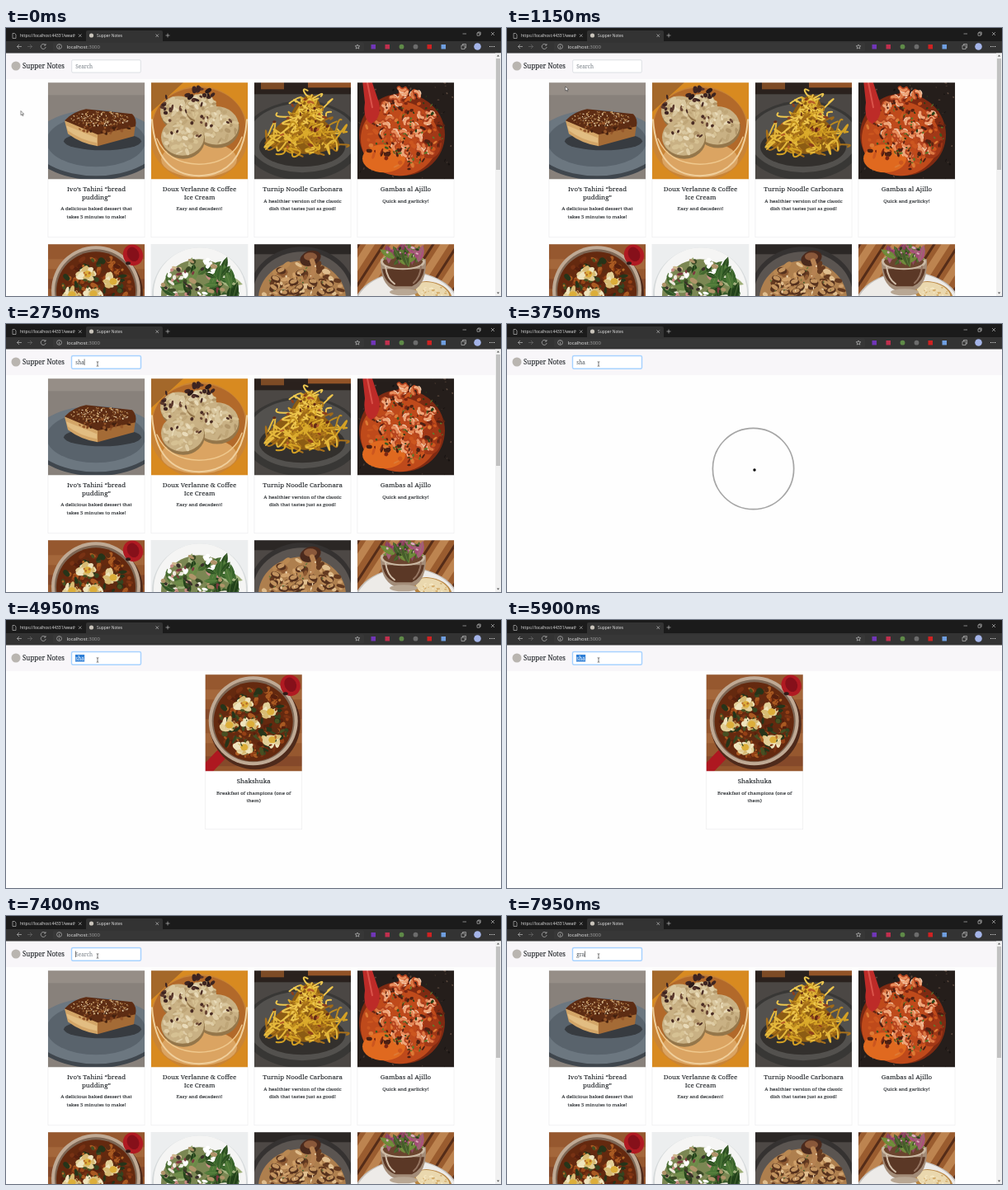
An HTML page for the animation above (8 s loop, 600 by 325 pixels).

```html
<!DOCTYPE html>
<html lang="en">
<head>
<meta charset="utf-8">
<title>Supper Notes</title>
<style>
  html, body { margin: 0; width: 100%; height: 100%; overflow: hidden; background: #fefefe; }
  #stage { display: block; width: 600px; height: 325px; font-family: "Noto Serif", serif; fill: #212529; }
  .ui { font-family: "Open Sans", sans-serif; font-size: 4.9px; fill: #e8e8e8; }
  .icon { fill: none; stroke: #cfcfcf; stroke-width: .6; }
  .name { font-size: 7.9px; font-weight: 500; text-anchor: middle; stroke: #212529; stroke-width: .12; }
  .about { font-size: 6.1px; text-anchor: middle; stroke: #212529; stroke-width: .12; }
  .photo { filter: blur(.4px); }
  #query { font-size: 6.4px; }
</style>
</head>
<body>
<svg id="stage" viewBox="0 0 600 325">
  <rect width="600" height="325" fill="#fefefe"/>
  <rect y="30" width="600" height="32" fill="#f8f6f9"/>

  <g id="chrome">
    <rect width="600" height="30.5" fill="#333"/>
    <path d="M0 0H600V16H190V5Q190 3 188 3H99Q97 3 97 5V16H0Z" fill="#1b1b1b"/>
    <rect x="57" y="17.5" width="377" height="10.5" rx="1.5" fill="#373737"/>
    <svg x="17" width="67" height="16"><text class="ui" y="11">https://localhost:44331/weatherforecast</text></svg>
    <text class="ui" x="110" y="11">Supper Notes</text>
    <circle cx="103.5" cy="9" r="2.6" fill="#c9c4bb"/>
    <text class="ui" x="73.5" y="24.8" style="font-size:6px">localhost<tspan fill="#a0a0a0">:3000</tspan></text>
    <path class="icon" d="M8 6.5h2.5l1.5 1.5v4.5h-4zM88 7.5l3.5 3.5m0-3.500l-3.5 3.500M181.500 7.500l3.500 3.500m0-3.500l-3.500 3.500M193.500 9h5m-2.500-2.500v5
      M553.500 7h4.500M571 6h3.200v3.200h-3.200zM572 6v-1h3.200v3.200h-1M588 5l4 4m0-4l-4 4"/>
    <path class="icon" d="M19 22.500H13.500M16 20l-2.500 2.500L16 25M47.500 20.500A3 3 0 1 0 48.200 23M48 19v2h-2M64.500 22v2.500M64.500 20.500v.7"/>
    <path class="icon" d="M26 22.500h5.500M29 20l2.500 2.500L29 25" opacity=".4"/>
    <circle class="icon" cx="64.500" cy="22.500" r="2.900"/>
    <path class="icon" d="M426 20l.8 1.800h2l-1.500 1.300.5 2-1.800-1.100-1.800 1.100.5-2-1.500-1.300h2zM552 21h4v4.500h-4zM553.500 21v-1.500h4v4.500h-1.500"/>
    <rect x="442.500" y="20" width="5.500" height="5.500" fill="#7136b8"/>
    <rect x="459.500" y="20" width="5.500" height="5.500" fill="#c02f4e"/>
    <circle cx="479.500" cy="22.700" r="2.900" fill="#5f8a48"/>
    <circle cx="496.500" cy="22.700" r="2.900" fill="#6c6c6c"/>
    <rect x="510.500" y="20" width="5.500" height="5.500" fill="#cf2222"/>
    <rect x="527.500" y="20" width="5.500" height="5.500" fill="#6f9fe0"/>
    <circle cx="571.500" cy="22.500" r="4.300" fill="#a4b4e8"/>
    <path d="M586 22.500h1.200m1.300 0h1.200m1.300 0h1.200" stroke="#ddd" stroke-width="1.100"/>
  </g>

  <circle cx="12" cy="46" r="5.500" fill="#b9b5b0"/>
  <text x="20" y="49" font-size="8" font-weight="500" stroke="#212529" stroke-width=".12">Supper Notes</text>

  <rect id="glow" x="78.700" y="37.800" width="85.600" height="17.200" rx="2.300" fill="#bfdeff"/>
  <rect id="field" x="79.700" y="38.800" width="83.600" height="15.200" rx="1.300" fill="#fff" stroke-width=".7"/>
  <rect id="selection" x="84" y="42" width="0" height="8.500" fill="#2f7fd6"/>
  <text id="query" x="84.300" y="48.600"></text>
  <rect id="caret" y="42.500" width=".6" height="7.500" fill="#222"/>

  <g id="list"></g>
  <g id="result"></g>
  <g id="spinner" fill="none" stroke="#000" stroke-width="1.700"><circle/><circle/></g>
  <path id="arrow" d="M0 0V5.200L1.300 4.100 2.200 6.100 3 5.700 2.100 3.800H3.700Z" fill="#fff" stroke="#222" stroke-width=".5"/>
  <path id="beam" d="M-1.300-2.800Q0-2.800 0-2V2Q0 2.800-1.300 2.800M1.300-2.800Q0-2.800 0-2M0 2Q0 2.800 1.300 2.800" fill="none" stroke="#222" stroke-width=".6"/>
</svg>

<script>
const $ = id => document.getElementById(id);

// ---------- drawing helpers ----------
let seed = 1;
const rnd = (a = 0, b = 1) => {
  seed = seed * 16807 % 2147483647;
  return a + (b - a) * seed / 2147483647;
};
const pick = colors => colors[Math.floor(rnd(0, colors.length))];
const rect = (x, y, w, h, fill) => `<rect x="${x}" y="${y}" width="${w}" height="${h}" fill="${fill}"/>`;
const backdrop = fill => rect(-3, -3, 123, 123, fill);
const oval = (x, y, rx, ry, fill, turn = 0) =>
  `<ellipse rx="${rx}" ry="${ry}" fill="${fill}" transform="translate(${x} ${y}) rotate(${turn})"/>`;
const shape = (d, fill) => `<path d="${d}" fill="${fill}"/>`;
const line = (d, stroke, width) =>
  `<path d="${d}" fill="none" stroke="${stroke}" stroke-width="${width}" stroke-linecap="round"/>`;

// Places n pieces at random inside an ellipse.
function scatter(n, cx, cy, rx, ry, piece) {
  let out = '';
  for (let i = 0; i < n; i++) {
    const a = rnd(0, 2 * Math.PI), r = Math.sqrt(rnd());
    out += piece(cx + rx * r * Math.cos(a), cy + ry * r * Math.sin(a));
  }
  return out;
}
const bits = (min, max, colors) => (x, y) =>
  oval(x, y, rnd(min, max), rnd(min, max) * .6, pick(colors), rnd(0, 180));
const curl = (size, width, colors) => (x, y) => {
  const p = () => rnd(-size, size);
  return line(`M${x} ${y}q${p()} ${p()} ${p()} ${p() * .7}t${p()} ${p() * .7}`, pick(colors), width);
};
const leaf = colors => (x, y) => {
  const turn = rnd(0, 360), size = rnd(.6, 1.1);
  return `<g transform="translate(${x} ${y}) rotate(${turn}) scale(${size})">` +
    shape('M-10 0Q-2-8 11 0Q-2 8-10 0', pick(colors)) + line('M-9 0H9', '#7f9c58', .4) + '</g>';
};
const prawn = (x, y) =>
  `<g transform="translate(${x} ${y}) rotate(${rnd(0, 360)})">` + line('M-4 3A5 5 0 0 1 4 3', '#b4431f', 5) +
  line('M-4 2A5 5 0 0 1 4 2', pick(['#e88d5c', '#f0a679', '#dd7a45']), 3.4) + line('M-2-2A5 5 0 0 1 3-1', '#f6cdaf', 1.2) + '</g>';

// ---------- photos, each 117 x 117 ----------
const photos = {
  pudding: () => backdrop('#88817b') + rect(-3, -3, 123, 18, '#968e87') +
    oval(58, 76, 78, 42, '#3f464d') + oval(58, 73, 76, 40, '#6c7780') + oval(58, 71, 60, 31, '#59636c') +
    oval(66, 71, 47, 11, '#373b40') +
    shape('M20 46L60 60V77Q40 74 24 62Z', '#d3a567') + shape('M60 60L106 50L104 65L60 77Z', '#a46b36') +
    shape('M22 52L59 67V73Q38 69 24 58Z', '#e2bd82') +
    shape('M20 46Q30 35 46 32L102 38Q108 44 106 53L60 63Z', '#5d2c13') +
    scatter(30, 68, 54, 32, 8, bits(1, 3, ['#7d411d', '#42200f', '#94562a'])) +
    scatter(150, 62, 44, 36, 9, bits(.5, 1.4, ['#f2dfbb', '#d7b27d', '#a8733f'])),

  iceCream: () => backdrop('#d88a20') + shape('M-3-3H42L-3 38Z', '#a4682a') +
    oval(58, 62, 60, 58, '#c98435') + oval(58, 52, 56, 46, '#b2692a') + oval(58, 93, 46, 22, '#dba462') +
    line('M1 45Q6 112 58 113Q111 112 116 45', '#f0cf9c', 2) + line('M7 68Q20 98 58 99Q98 98 110 66', '#efc88d', 1.5) +
    [[33, 35, 22], [60, 30, 19], [79, 52, 27], [38, 66, 26]].map(([x, y, r]) =>
      oval(x + 1, y + 3, r, r * .9, '#94764a') + oval(x, y, r, r * .86, '#c9b184') +
      scatter(40, x, y, r * .9, r * .8, bits(1.5, 5, ['#b1966a', '#dfcda6', '#bfa678', '#d6c193'])) +
      scatter(16, x - 3, y - 6, r * .6, r * .4, bits(2, 5, ['#e9dbb9', '#d9c79f']))).join('') +
    scatter(16, 63, 15, 20, 9, bits(2, 5, ['#3d2421', '#54322a', '#2b1918'])) +
    scatter(9, 20, 29, 9, 12, bits(2, 4, ['#3d2421', '#5a382c'])) +
    scatter(18, 57, 48, 40, 30, bits(1.5, 3.4, ['#4a2c24', '#6a4634'])),

  noodles: () => backdrop('#4b4744') + rect(-3, -3, 123, 17, '#2a211d') +
    rect(8, -3, 28, 11, '#7d4b25') + rect(65, -3, 55, 9, '#925327') +
    oval(58, 70, 72, 48, '#383735') + oval(58, 67, 66, 42, '#53514e') + oval(58, 78, 52, 24, '#33302d') +
    shape('M12 74Q24 52 42 43Q54 16 70 14Q82 20 82 44Q98 55 104 76Q60 98 12 74Z', '#8c5c14') +
    scatter(50, 58, 69, 40, 17, curl(13, 2, ['#d5a224', '#e5b93c', '#a9711a', '#bd8a1e'])) +
    scatter(45, 60, 48, 22, 18, curl(11, 2, ['#dbab2c', '#eec64d', '#a06a18', '#c4921f'])) +
    scatter(18, 66, 26, 11, 12, curl(9, 2, ['#dcae30', '#edc850', '#b07a1c'])) +
    scatter(24, 56, 52, 33, 32, bits(1.2, 3.6, ['#8d3f1c', '#642a14', '#b65e28'])),

  shrimp: () => backdrop('#251e1b') + scatter(110, 58, 58, 80, 80, bits(.5, 2, ['#43352d', '#5d4a3f', '#171210'])) +
    oval(54, 63, 52, 50, '#7f2a12') + oval(51, 68, 47, 45, '#bf4a1b') +
    oval(32, 92, 26, 17, '#e0691f') + oval(87, 72, 15, 20, '#a23817') +
    scatter(110, 55, 60, 47, 46, bits(1.5, 4.5, ['#7c2612', '#dd7a35', '#cc561f', '#4d2013'])) +
    scatter(42, 62, 50, 42, 42, prawn) +
    scatter(80, 60, 54, 46, 46, bits(.8, 2.6, ['#3c5920', '#5d7a2d', '#2a3f19', '#5a2312'])) +
    shape('M6-3H17L26 24Q30 42 17 50Q6 45 9 24Z', '#bd2b28') + line('M12 0L18 30', '#d9524a', 2),

  shakshuka: () => backdrop('#96582f') +
    [18, 42, 71, 99].map((y, i) => rect(-3, y, 123, 12, i % 2 ? '#85492a' : '#a4673b')).join('') +
    line('M-2 119L18 98', '#ae1820', 14) + oval(60, 60, 55, 55, '#4e2a1b') +
    oval(58, 56, 54, 54, '#bfa994') + oval(58, 56, 50, 50, '#7d6654') + oval(58, 57, 48, 48, '#64290f') +
    scatter(120, 58, 58, 43, 43, bits(2, 5, ['#944016', '#56200e', '#a95a22', '#783214'])) +
    scatter(95, 58, 57, 42, 42, bits(2, 6, ['#344420', '#474f22', '#263419', '#5c2b12'])) +
    [[47, 36], [78, 45], [28, 61], [54, 60], [80, 79], [46, 88]].map(([x, y]) =>
      scatter(14, x, y, 9, 7, bits(3.500, 6.500, ['#e3cf98', '#d8bb74', '#efe4bd'])) +
      oval(x + 1, y, 4.5, 4, '#dcae3a')).join('') +
    scatter(40, 58, 57, 42, 42, bits(.8, 2.500, ['#3a4a22', '#7d3413', '#b56a28'])) +
    oval(103, 13, 12, 13, '#b01a22', -25) + oval(103, 12, 7, 9, '#86101a', -25) + oval(97, 23, 3, 2, '#321b18'),

  salad: () => backdrop('#eceeef') + oval(59, 61, 58, 57, '#d5d9da') + oval(59, 59, 56, 55, '#f5f5f4') +
    oval(58, 62, 46, 44, '#7b8753') +
    scatter(60, 58, 58, 45, 40, leaf(['#2f5426', '#44692f', '#6c8a48', '#22421a', '#a5b380'])) +
    scatter(60, 52, 50, 40, 32, bits(2, 5, ['#eeeade', '#cfb98f', '#b0946a', '#fff', '#3b4a26'])) +
    scatter(24, 48, 48, 34, 24, bits(1.500, 4, ['#7d3a40', '#39302a', '#c98d85'])) +
    scatter(12, 84, 40, 18, 18, leaf(['#37632a', '#4c7837', '#2a4f20'])),

  mushrooms: () => backdrop('#4d4845') + rect(-3, -3, 123, 15, '#2b2725') +
    oval(58, 62, 65, 59, '#353231') + oval(58, 62, 60, 53, '#5b5551') + oval(58, 66, 53, 46, '#ae7f4e') +
    scatter(120, 58, 62, 49, 40, bits(2, 6, ['#cfa06b', '#8d5932', '#e0be8e', '#643a20', '#b98852'])) +
    scatter(30, 58, 60, 44, 35, (x, y) => oval(x, y, 6, 4, '#55311d', rnd(-40, 40)) + oval(x, y - 1, 4.500, 2.500, '#c2935f', rnd(-40, 40))) +
    oval(68, 17, 13, 9, '#4b2a1d', -20) + oval(68, 15, 8, 5, '#8a583a') + line('M70 20Q75 31 69 39', '#b68252', 6) +
    scatter(45, 58, 58, 46, 34, bits(.7, 1.800, ['#43602d', '#667a3c', '#efd9b4'])),

  mousse: () => backdrop('#9a5c2f') +
    [-40, -10, 20, 50, 80, 110].map(x => line(`M${x} 65L${x + 45}-5`, '#552c18', 3) + line(`M${x + 14} 65L${x + 59}-5`, '#bd8450', 9)).join('') +
    oval(60, 81, 66, 48, '#c4c0bc') + oval(60, 79, 63, 45, '#edebe8') +
    oval(91, 60, 24, 14, '#b98643', 18) + oval(91, 58, 21, 11, '#ead8ae', 18) +
    scatter(30, 91, 58, 17, 8, bits(.7, 2, ['#d3aa67', '#f6e8c3'])) +
    shape('M28 18Q27 48 45 56H68Q84 48 83 18Z', '#a38c78') + shape('M30 30Q33 47 46 51H66Q79 45 81 30Z', '#5b3826') +
    oval(55, 21, 27, 10, '#cbb9a4') + oval(55, 21, 24, 8, '#6b452f') +
    line('M34 27Q36 42 45 48', '#d0bda9', 2) + line('M77 27Q76 40 68 47', '#947460', 2) +
    scatter(24, 55, 12, 22, 9, leaf(['#6f8a39', '#8e3b62', '#465d2a', '#a8557b'])) +
    scatter(26, 55, 10, 20, 8, bits(1, 3, ['#a14a76', '#dca9bd', '#5e7a33', '#2f401e'])) + oval(56, 58, 17, 4, '#b8a794'),
};

function card(x, y, photo, names = [], abouts = []) {
  seed = 4211;
  const lines = (cls, list, top, step) => list.map((s, i) =>
    `<text class="${cls}" x="${x + 58.5}" y="${top + i * step}">${s}</text>`).join('');
  return `<rect x="${x}" y="${y}" width="117" height="187.5" fill="#fff" stroke="#e9e9ec" stroke-width=".6"/>` +
    `<svg x="${x}" y="${y}" width="117" height="117"><g class="photo">${photos[photo]()}</g></svg>` +
    lines('name', names, y + 132, 9.5) +
    lines('about', abouts, y + 145.5 + (names.length - 1) * 9.5, 9.4);
}

const scrollbar = rect(593, 30.5, 7, 294.5, '#f1f1f1') + rect(594, 37, 5, 135, '#c1c1c1') +
  shape('M594.800 34.500L596.500 32.500L598.200 34.500ZM594.800 320.500L596.500 322.500L598.200 320.500Z', '#555');

$('list').innerHTML =
  card(51, 66.3, 'pudding', ['Ivo’s Tahini “bread', 'pudding”'], ['A delicious baked dessert that', 'takes 5 minutes to make!']) +
  card(176, 66.3, 'iceCream', ['Doux Verlanne &amp; Coffee', 'Ice Cream'], ['Easy and decadent!']) +
  card(301, 66.3, 'noodles', ['Turnip Noodle Carbonara'], ['A healthier version of the classic', 'dish that tastes just as good!']) +
  card(426, 66.3, 'shrimp', ['Gambas al Ajillo'], ['Quick and garlicky!']) +
  ['shakshuka', 'salad', 'mushrooms', 'mousse'].map((p, i) => card(51 + 125 * i, 262.3, p)).join('') +
  scrollbar;
$('result').innerHTML = card(241.7, 66.3, 'shakshuka', ['Shakshuka'], ['Breakfast of champions (one of', 'them)']);

// ---------- timeline ----------
const LOOP = 8000, STEP = 50, FOCUS = 1600, SELECT = 4700, CLEAR = 6250;
const typing = [[0, ''], [FOCUS, ''], [2400, 's'], [2550, 'sh'], [2700, 'sha'], [CLEAR, ''], [7550, 'g'], [7700, 'gr'], [7850, 'gra']];
const views = [[0, 'list'], [3250, 'spinner'], [3950, 'result'], [6850, 'spinner'], [7400, 'list']];
const latest = (steps, t) => steps.filter(([at]) => at <= t).pop();
const show = (id, on) => $(id).setAttribute('visibility', on ? 'visible' : 'hidden');
const set = (node, attrs) => { for (const key in attrs) node.setAttribute(key, attrs[key]); };

// cubic-bezier(0, .2, .8, 1), solved by bisection
function rippleEase(x) {
  let lo = 0, hi = 1, s;
  for (let i = 0; i < 20; i++) {
    s = (lo + hi) / 2;
    if (2.4 * (1 - s) * s * s + s ** 3 < x) lo = s; else hi = s;
  }
  return .6 * (1 - s) ** 2 * s + 3 * (1 - s) * s * s + s ** 3;
}

function drawField(t) {
  const [since, text] = latest(typing, t);
  const focused = t >= FOCUS, selected = t >= SELECT && t < CLEAR;
  const query = $('query');
  query.textContent = text || 'Search';
  query.setAttribute('fill', selected ? '#fff' : text ? '#495057' : '#747c83');
  const width = text ? query.getComputedTextLength() : 0;
  show('glow', focused);
  $('field').setAttribute('stroke', focused ? '#80bdff' : '#ced4da');
  $('selection').setAttribute('width', selected ? width + .6 : 0);
  $('caret').setAttribute('x', 84.2 + width);
  show('caret', focused && !selected && (t - since) % 1060 < 530);
}

function drawSpinner(t, start) {
  [...$('spinner').children].forEach((ring, i) => {
    const p = rippleEase(((t - start) / 1000 + i / 2) % 1);
    set(ring, { cx: 300 - 2.3 * p, cy: 177 - 2.3 * p, r: .85 + 74.5 * p, opacity: 1 - p });
  });
}

function drawPointer(t) {
  const k = Math.min(1, Math.max(0, (t - 850) / 550));
  const p = k * k * (3 - 2 * k);
  const x = 18 + 93 * p, y = 100.5 - 52 * p;
  const inside = x > 80 && x < 163 && y > 39 && y < 54;
  show('arrow', !inside);
  show('beam', inside);
  $(inside ? 'beam' : 'arrow').setAttribute('transform', `translate(${x} ${y})`);
}

function frame() {
  const t = Math.floor(performance.now() % LOOP / STEP) * STEP;
  const [start, view] = latest(views, t);
  for (const id of ['list', 'result', 'spinner']) show(id, id === view);
  if (view === 'spinner') drawSpinner(t, start);
  drawField(t);
  drawPointer(t);
  requestAnimationFrame(frame);
}
frame();
</script>
</body>
</html>
```
